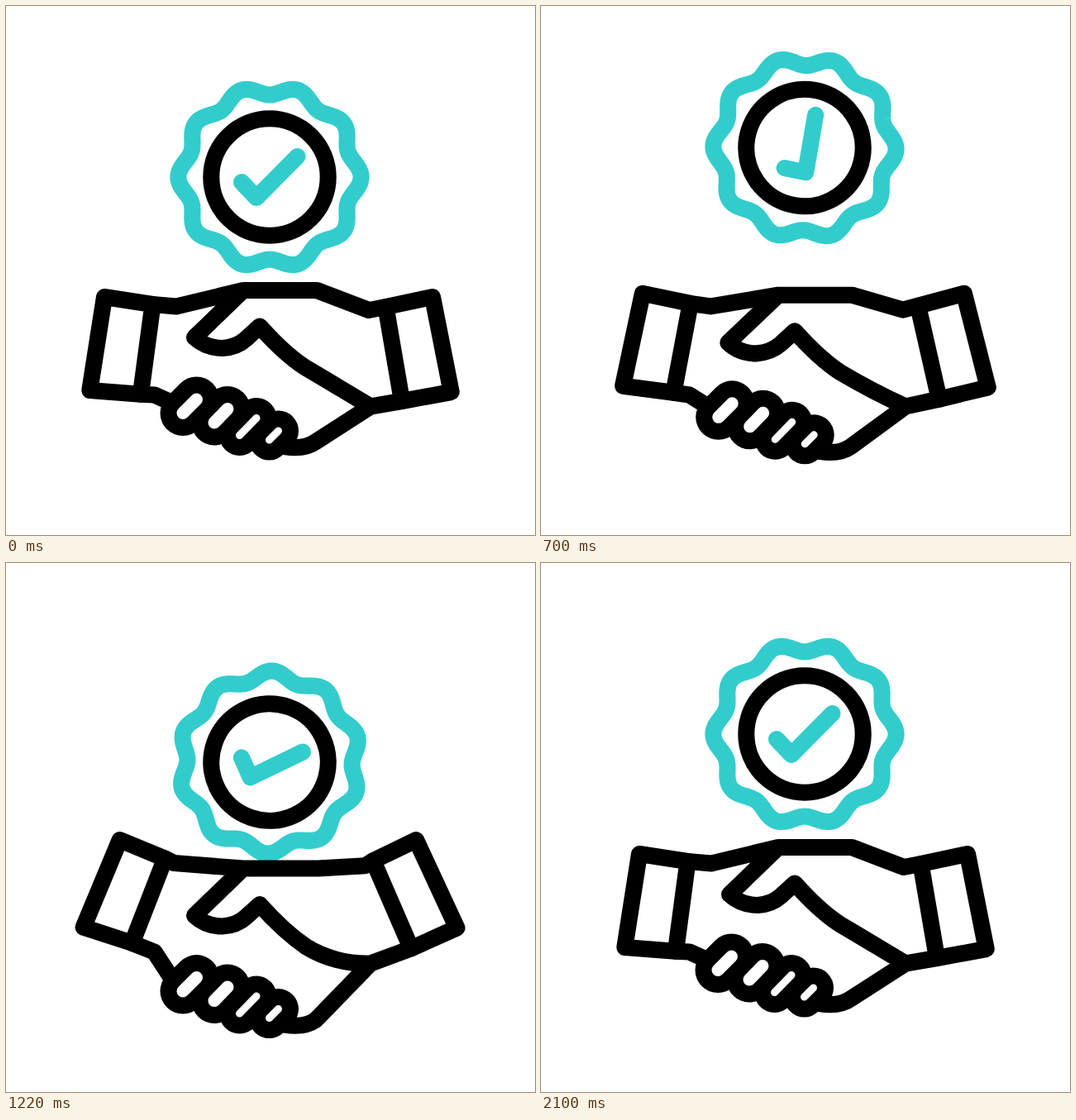
Write an HTML page that moves like this. It is 640x640 px and loops after 2400 ms.

```html
<!DOCTYPE html>
<html lang="en">
<head>
<meta charset="utf-8">
<title>Handshake with seal</title>
<style>
  html, body { margin: 0; height: 100%; overflow: hidden; background: #fff; }
  svg { display: block; width: 100%; height: 100%; }
  path, circle { fill: none; stroke: #000; stroke-width: 20.1; stroke-linecap: round; stroke-linejoin: round; }
  .teal { stroke: #33cccc; }
  .wide { stroke-width: 55; }
  .slim { stroke-width: 49; }
  .gap { stroke: #fff; stroke-width: 15; }
  .gap.slim { stroke-width: 9; }
  #palm { fill: #fff; stroke: none; }
</style>
</head>
<body>
<svg viewBox="0 0 640 640">
  <g id="badge">
    <path id="seal" class="teal"/>
    <circle r="70.7"/>
    <path class="teal" d="M-34 6L-16 25L33.5 -25"/>
  </g>
  <path id="palm"/>
  <path id="lines"/>
  <path id="leftCuff" d="M119 352L101.3 465L163 469.7L177.5 361Z"/>
  <path id="rightCuff" d="M516 352L538.7 467L479 478L459.5 364Z"/>
  <g id="fingers">
    <path class="wide" d="M230.5 476L214 492.5M268 487.5L252 504"/>
    <path class="slim" d="M303 498.5L282.5 519.5M329.5 514L318.5 525"/>
    <path class="gap" d="M230.5 476L214 492.5M268 487.5L252 504"/>
    <path class="gap slim" d="M303 498.5L282.5 519.5M329.5 514L318.5 525"/>
  </g>
</svg>
<script>
const LOOP = 2400, STEP = 20, PUSH = 28;
const $ = id => document.getElementById(id);
const set = (id, name, value) => $(id).setAttribute(name, value);

// [time, value] keys, eased by a half cosine between neighbours
const height = [[0, 207], [420, 253.3], [690, 171.5], [1145, 254], [1405, 186.5], [1840, 223.5], [2100, 207]];
const spin = [[0, 0], [562, -57.5], [1060, 69], [1415, -48.3], [1830, 0]];
const recoil = [[250, 0], [420, 28], [820, 0], [1000, 0], [1145, 28.5], [1505, 0]];

function track(keys, t) {
  if (t <= keys[0][0]) return keys[0][1];
  for (let i = 1; i < keys.length; i++) {
    const [t0, a] = keys[i - 1], [t1, b] = keys[i];
    if (t < t1) return a + (b - a) * (1 - Math.cos(Math.PI * (t - t0) / (t1 - t0))) / 2;
  }
  return keys[keys.length - 1][1];
}

function turn([x, y], deg, [cx, cy]) {
  const a = deg * Math.PI / 180, c = Math.cos(a), s = Math.sin(a);
  return [cx + (x - cx) * c - (y - cy) * s, cy + (x - cx) * s + (y - cy) * c];
}

function sealPath() {
  const pts = [];
  for (let i = 0; i < 360; i++) {
    const a = i * Math.PI / 180, r = 105.1 + 5.5 * Math.cos(10 * a);
    pts.push((r * Math.cos(a)).toFixed(2) + ' ' + (r * Math.sin(a)).toFixed(2));
  }
  return 'M' + pts.join('L') + 'Z';
}

const leftHub = [199, 421], rightHub = [436, 426];

function draw(t) {
  const y = track(height, t);
  const d = Math.max(0, y - 225.5, track(recoil, t));  // how far the hands are pushed down
  const p = d / PUSH, tilt = 15 * p;
  const q = t < 900 ? p : 0;                           // grip squeeze, first bounce only
  const left = pt => turn(pt, tilt, leftHub), right = pt => turn(pt, -tilt, rightHub);
  const gripX = 3.5 * q, gripY = d - 4.5 * q;

  set('badge', 'transform', `translate(319 ${y}) rotate(${track(spin, t)})`);
  set('leftCuff', 'transform', `rotate(${tilt} ${leftHub})`);
  set('rightCuff', 'transform', `rotate(${-tilt} ${rightHub})`);
  set('fingers', 'transform', `translate(${gripX} ${gripY})`);

  const top = `M${left([177.5, 361])}L${206 - 3 * p} ${363.5 - p / 2}L287 ${344 + d}H${376 + 2 * p}` +
    `L${439 - 4.5 * p} ${368 - 2 * p}L${right([459.5, 364])}`;
  const bottom = `L441 484.5L375 ${527 + d}Q361 ${537 + d} 337 ${533 + d}`;
  const cuffEnd = left([163, 469.7]), wrist = 'L179.5 470.5', knuckle = `${203 + gripX} ${481 + gripY}`;
  const thumb = `M287 ${344 + d}L${228 - 8 * q} ${401 + d + 3 * q}` +
    `Q${242 - 8 * q} ${414 + d + 3 * q} ${262 - 8 * q} ${414 + d + 3 * q}` +
    `Q${279 - 4 * q} ${413 + d + 2 * q} 290 ${403 + d}L307 ${387.5 + d}`;
  const index = `C326.5 ${409.5 + d} 344 ${425.5 + d} ${361.5 + 2 * p} ${437 + 30 * p}` +
    `C${388 - 3 * p} ${452.5 + 28 * p} 414 ${468.5 + 18.5 * p} 441 484.5`;

  set('palm', 'd', top + `L${right([479, 478])}` + bottom + 'L' + knuckle + wrist + `L${cuffEnd}Z`);
  set('lines', 'd', top + `M${right([479, 478])}` + bottom + `M${cuffEnd}` + wrist + 'L' + knuckle + thumb + index);
}

set('seal', 'd', sealPath());
const start = performance.now();
function frame() {
  const t = (performance.now() - start) % LOOP;
  draw(Math.floor(t / STEP) * STEP);
  requestAnimationFrame(frame);
}
frame();
</script>
</body>
</html>
```
